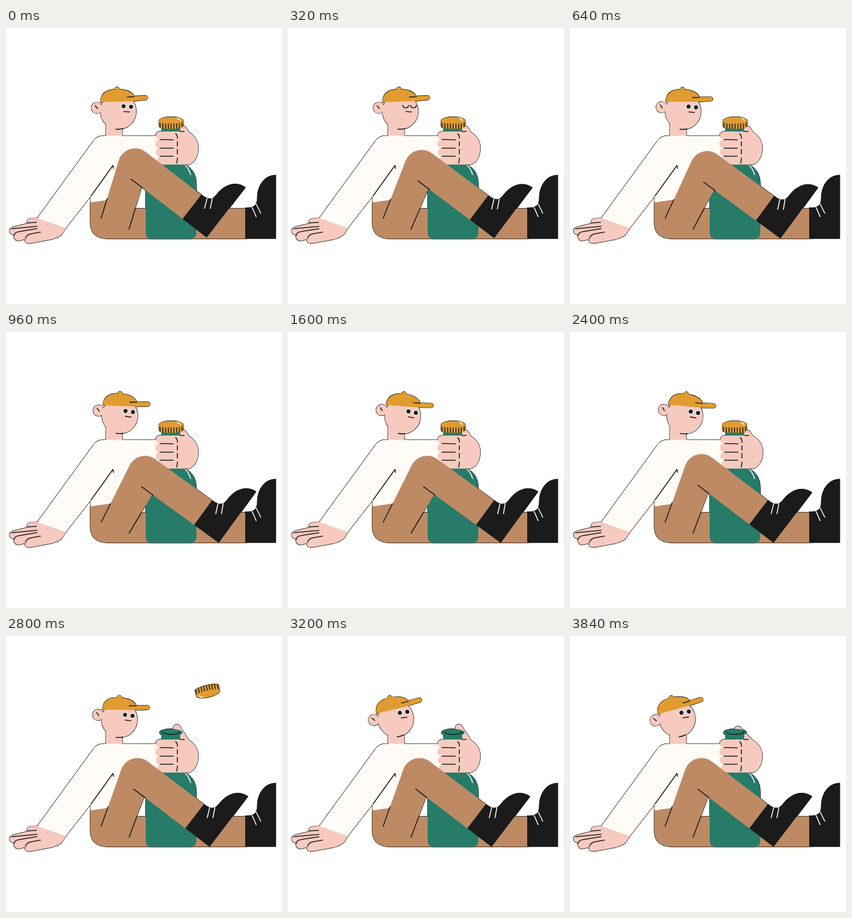
Write an HTML page with a canvas that moves like this. It is 480x480 px and loops after 4 s.

```html
<!DOCTYPE html>
<html lang="en">
<head>
<meta charset="utf-8">
<title>Bottle pop</title>
<style>
html, body { margin: 0; width: 100%; height: 100%; overflow: hidden; background: #fff; }
canvas { display: block; }
</style>
</head>
<body>
<canvas id="stage" width="480" height="480"></canvas>
<script>
const ctx = document.getElementById('stage').getContext('2d');
const LOOP = 4000, RAD = Math.PI / 180;
const INK = '#1b1b1b', SKIN = '#f6cabf', SHIRT = '#fffcf7', BROWN = '#be8a64',
      GREEN = '#267b69', GOLD = '#e09c30', WHITE = '#fff';
let outline = false;

// Shapes are drawn twice: black strokes first, then fills, leaving a thin silhouette line.
function part(color, d) {
  const p = new Path2D(d);
  if (outline) {
    ctx.strokeStyle = '#000';
    ctx.lineWidth = 1.3;
    ctx.stroke(p);
  } else {
    ctx.fillStyle = color;
    ctx.fill(p);
  }
}

function line(d, color = INK, width = 1.6) {
  if (outline) return;
  ctx.strokeStyle = color;
  ctx.lineWidth = width;
  ctx.stroke(new Path2D(d));
}

function disc(color, x, y, r) {
  part(color, `M${x - r},${y}a${r},${r} 0 1 1 ${2 * r},0a${r},${r} 0 1 1 ${-2 * r},0Z`);
}

function at(x, y, deg, draw) {
  ctx.save();
  ctx.translate(x, y);
  ctx.rotate(deg * RAD);
  draw();
  ctx.restore();
}

// Smooth interpolation through [time, value] pairs.
function keys(t, ...list) {
  for (let i = 1; i < list.length; i++) {
    const [a, from] = list[i - 1], [b, to] = list[i];
    if (t < b) {
      const u = Math.max(0, (t - a) / (b - a));
      return from + (to - from) * u * u * (3 - 2 * u);
    }
  }
  return list[list.length - 1][1];
}

function shoe() {
  part(INK, 'M-1,0H52V-110C33,-109 20,-94 20,-68Q20,-53 2,-53H-1Z');
  line('M11,-54L18,-38M18,-60L26,-44', WHITE);
}

function torso() {
  part(SKIN, 'M58,330.5Q38,329.5 36.5,336L37,340L14,345.5Q5,348 6.5,355Q8,359 13.5,359.5Q13,370 22,370' +
    'L33,367.5Q32,375 42,374.5L80,367.5Q94,363 98,358L105,347L75,325Z');
  line('M37,339L53,338M10,349L54,345M14,361Q15,355 23,354L54,349M34,366Q35,360 43,358L60,355');
  part(SKIN, 'M174,165H202.5V189H174Z');
  part(SHIRT, 'M170,187.5H290V238L240,240L190,305L147,310V293L104,348L54.5,330.5L152,196.5Q158,187.5 170,187.5Z');
  line('M187,244L186,239L148,292');
  part(BROWN, 'M146.5,303.5Q160,301.5 180,298.5L200,314H420V366.5H175Q146.5,365 146.5,338Z');
}

function head(tilt, blink) {
  at(188, 182, tilt, () => {
    ctx.translate(-188, -182);
    disc(SKIN, 157.8, 138.8, 9.7);
    disc(SKIN, 195.3, 145, 31.2);
    line('M155,135L159,140M191,176Q198,176.5 203,175M205,145.3L215,146');
    disc(GOLD, 193, 106.5, 3.8);
    part(GOLD, 'M164.5,129C164.5,113 176,106.5 193,106.5C208,106.5 219,111 223,118.5L242.5,117.5' +
      'a3.8,3.8 0 0 1 0,7.6L224,127Z');
    line('M211,120L223,119.5');
    if (blink) {
      line('M199.5,134.5q1,4.3 5.2,4.3t5.2,-4.3M213,134.5q1,4.3 5.2,4.3t5.2,-4.3');
    } else if (!outline) {
      for (const [x, y] of [[204.5, 136], [217.5, 137]]) {
        disc(WHITE, x, y, 4.9);
        disc(INK, x, y, 3.6);
      }
    }
  });
}

function thumb(x, y) {
  ctx.beginPath();
  ctx.moveTo(315, 188);
  ctx.lineTo(x, y);
  ctx.strokeStyle = outline ? '#000' : SKIN;
  ctx.lineWidth = outline ? 14.3 : 13;
  ctx.stroke();
}

function cap(u, strain) {
  const x = 287.2 - strain + 190 * u, y = 165 - 230 * u + 70 * u * u;
  at(x, y, 500 * u, () => {
    part(GOLD, 'M-21,-3.5a21,7 0 0 1 42,0V6a21,4.5 0 0 1 -42,0Z');
    for (let i = -4; i <= 4; i++) {
      const sx = i * 4.8, k = Math.sqrt(1 - (sx / 21) ** 2);
      line(`M${sx},${3 * k - 1}V${5 + 5 * k}`);
    }
    line('M11,-8q4,1 5,4', WHITE);
  });
}

function bottle(open) {
  part(GREEN, 'M243,356.5V275Q243,240 271,234V168H303V234Q331,243 331,272V356.5' +
    'q0,10 -10,10H253q-10,0 -10,-10Z');
  line('M312,239Q318,245 321,255', WHITE);
  if (open) {
    part(GREEN, 'M267,168a20,6.5 0 1 1 40,0a20,6.5 0 1 1 -40,0Z');
    line('M272,167q2,4 15,4t16,-4');
  }
}

function hand() {
  part(SKIN, 'M268,180H303L309,174L318,181Q334.5,191 334.5,209Q334,230 319,237.5H272a7,7 0 0 1 -4,-14.5' +
    'a7,7 0 0 1 -1,-14a7.4,7.4 0 0 1 0,-15a7,7 0 0 1 1,-14Z');
  line('M268,194L291,194.5M268,209H291M268,223H291M303,180H310');
  line('M295,184q4,3 3,8M298,198v7M298,211v8M298,226q0,4 -1,9');
}

function frontLeg(heelX, heelY, deg) {
  const c = Math.cos(deg * RAD), s = Math.sin(deg * RAD);
  const ax = heelX - 52 * c, ay = heelY - 52 * s;
  const toStage = (x, y) => [ax + x * c - y * s, ay + x * s + y * c];
  const [kx, ky] = toStage(-123, -23), inner = toStage(-91, 0);
  const hip = [165.5, 331], r = 30;
  const dx = kx - hip[0], dy = ky - hip[1], dist = Math.hypot(dx, dy);
  const dir = Math.atan2(dy, dx) - Math.asin(r / dist), len = Math.sqrt(dist * dist - r * r);
  const edge = n => [hip[0] + n * Math.cos(dir), hip[1] + n * Math.sin(dir)];

  part(BROWN, `M${hip}L${edge(len)}L${kx},${ky}L${inner}L214,350Z`);
  disc(BROWN, kx, ky, r);
  at(ax, ay, deg, () => {
    part(BROWN, 'M-114,0L-123,-53H2V0Z');
    line('M-114,0H-89');
    shoe();
  });
  const low = (314 - inner[1]) / (350 - inner[1]);
  line(`M${hip}L${edge(36)}M214,350L${inner[0] + (214 - inner[0]) * low},314`);
}

function scene(t) {
  const slide = 1 - (1 - Math.min(t / 960, 1)) ** 1.5;
  const back = keys(t, [1600, 0], [2400, 1]);
  const heelX = 349 + 21 * slide - 16 * back;
  const tilt = keys(t, [320, 0], [960, 4.2], [1600, 6.5], [2400, 7], [2640, 7], [3200, -12], [3840, -13]);
  const strain = keys(t, [2080, 0], [2400, 1], [2560, 1], [2640, 0]);
  const fly = Math.max(0, (t - 2640) / 480);
  const tx = keys(t, [2560, 308], [2720, 297], [3200, 297], [3840, 292]);
  const ty = keys(t, [2560, 177], [2720, 160], [3200, 160], [3840, 163.5]);

  torso();
  head(tilt, t >= 240 && t < 480);
  at(417, 366, 0, shoe);
  thumb(tx, ty);
  bottle(fly > 0);
  cap(fly, strain);
  at(strain, 0, 0, hand);
  frontLeg(heelX, 364.4 + 2.3 * slide, 37.7 - 1.7 * slide + 1.3 * back);
}

function frame(now) {
  const ms = now % LOOP;
  const slow = (ms >= 1120 && ms < 1600) || (ms >= 2400 && ms < 2560) || ms >= 3360;
  const step = slow ? 160 : 80;
  const t = Math.floor(ms / step) * step;
  ctx.fillStyle = WHITE;
  ctx.fillRect(0, 0, 480, 480);
  ctx.lineCap = ctx.lineJoin = 'round';
  for (outline of [true, false]) scene(t);
  requestAnimationFrame(frame);
}
requestAnimationFrame(frame);
</script>
</body>
</html>
```
